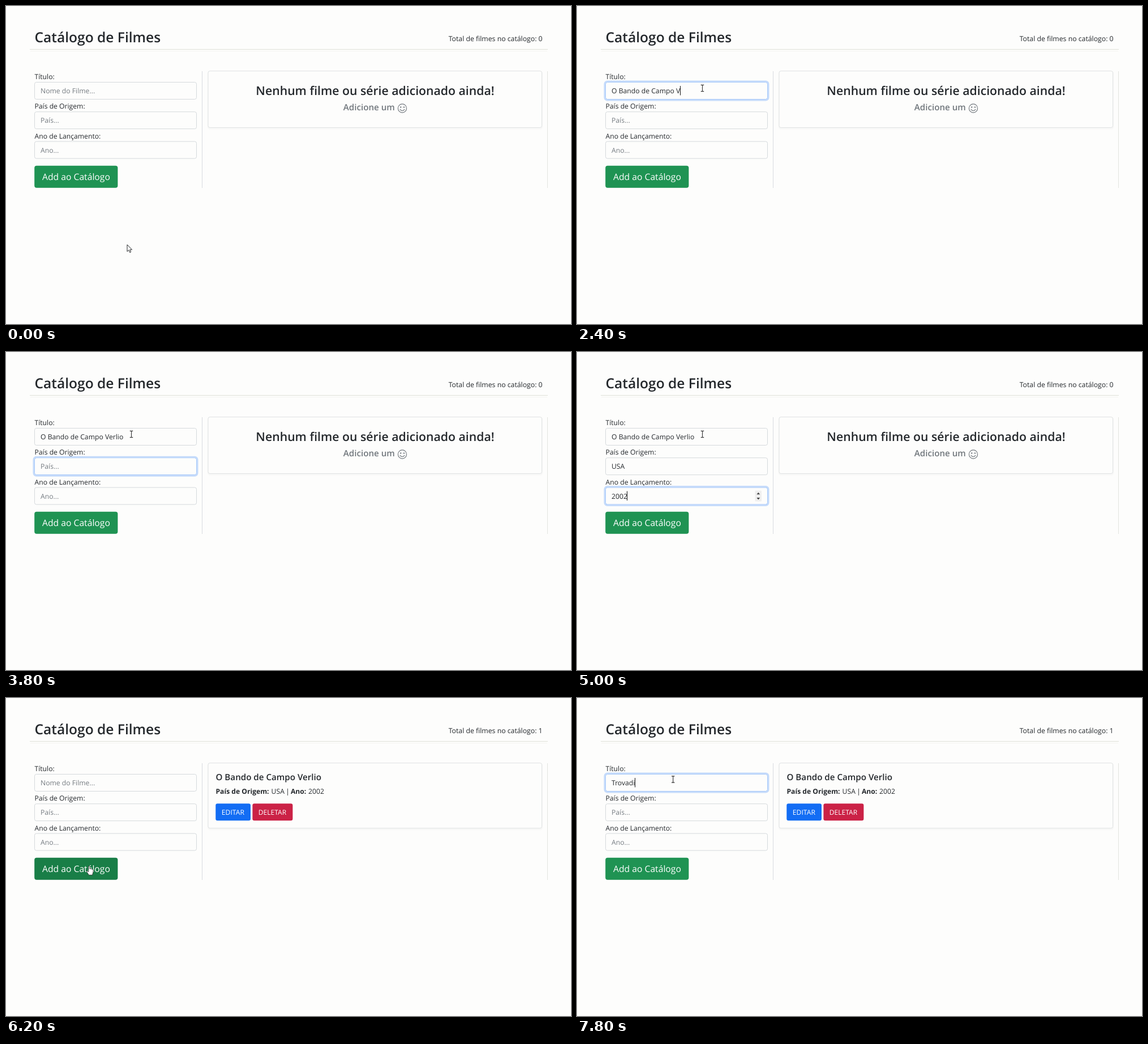
Animation of 998 by 561 pixels, one loop 8 s. Source, as an HTML page:

```html
<!DOCTYPE html>
<html lang="pt-BR">
<head>
<meta charset="utf-8">
<title>Catálogo de Filmes</title>
<style>
  html, body { margin: 0; width: 100%; height: 100%; overflow: hidden; background: #fdfdfc; }
  svg { display: block; width: 100vw; height: 100vh; }
  text { font: 12.18px "Open Sans", "Noto Sans", sans-serif; fill: #24282c; white-space: pre; text-rendering: geometricPrecision; }
  .semi { font-weight: 600; }
  .bold { font-weight: 700; }
  .end { text-anchor: end; }
  .mid { text-anchor: middle; }
  .light { fill: #fff; }
  .gray { fill: #71777d; }
  .box { fill: #fdfdfc; stroke: #d5d9dc; }
  .card { fill: #fdfdfc; stroke: #dfe2e2; }
  .shade { fill: none; stroke: #000; stroke-opacity: .02; stroke-width: 4; }
  .ring { fill: none; stroke: #c5dbfb; stroke-width: 3; }
</style>
</head>
<body>
<svg id="stage" viewBox="0 0 998 561"></svg>
<script>
const LOOP = 8000, STEP = 200;
const FILM = "O Bando de Campo Verlio", NEXT_FILM = "Trovadil", COUNTRY = "USA", YEAR = "2002";
const ADDED_AT = 6200;

const rect = (x, y, w, h, r, attrs) =>
  `<rect x="${x}" y="${y}" width="${w}" height="${h}" rx="${r}" ${attrs}/>`;
const text = (x, y, s, cls = "", size = 12.18, id = "") =>
  `<text x="${x}" y="${y}" class="${cls}" style="font-size:${size}px" id="${id}">${s}</text>`;
const line = (d, color, attrs = "") => `<path d="${d}" fill="none" stroke="${color}" ${attrs}/>`;

const fields = [
  { label: "Título:", hint: "Nome do Filme...", y: 134.5 },
  { label: "País de Origem:", hint: "País...", y: 186.7 },
  { label: "Ano de Lançamento:", hint: "Ano...", y: 239 }
];

const fieldMarkup = ({ label, y }, i) =>
  text(50.5, y - 5.3, label) +
  rect(50.5, y, 286, 30, 3.2, `class="box" id="box${i}"`) +
  rect(49, y - 1.5, 289, 33, 4.6, `class="ring" id="ring${i}"`) +
  text(61, y + 19.6, "", "", 12.18, "value" + i);

const card = h =>
  rect(357.5, 116, 589, h, 3.2, 'class="shade"') +
  rect(357, 114.7, 589.5, h, 3.2, 'class="card"');

const wink = `<g transform="translate(700 180.5)" fill="none" stroke="#71777d" stroke-width="1.1" stroke-linecap="round">
  <circle r="7.6"/><path d="M-4 1.9Q0 6.6 4 1.9M1.6 -1.7Q3 -3 4.4 -1.7"/>
  <ellipse cx="-2.7" cy="-2" rx="1" ry="1.4" fill="#71777d" stroke="none"/></g>`;

const cursors = `
  <path id="arrow" d="M0 0V12.2L2.8 9.6L4.8 13.9L6.7 13L4.8 8.9H8.6Z" fill="#fff" stroke="#26282a" stroke-width="1"/>
  <path id="beam" d="M-2.7 -5.6H-.7L0 -5L.7 -5.6H2.7M0 -5V5M-2.7 5.6H-.7L0 5L.7 5.6H2.7" fill="none" stroke="#333" stroke-width="1.1"/>
  <path id="hand" d="M-2.2 -7Q-.9 -8.2 .2 -7V-2.7Q1.5 -3.6 2.4 -2.3Q3.7 -3 4.4 -1.7Q5.8 -2 6 -.4V3.2L4.6 8.3H-1.6L-5.2 2.9Q-5.6 .7 -3.8 1.2L-2.2 2.6Z" fill="#fff" stroke="#25302a" stroke-width=".9" stroke-linejoin="round"/>`;

const $ = id => document.getElementById(id);
$("stage").innerHTML =
  text(50.5, 64, "Catálogo de Filmes", "semi", 24.55) +
  text(947.6, 62, "", "end", 12.25, "total") +
  line("M42 76.5H957", "#dfe1d8") +
  line("M43 79.5H956", "#f4f4f0") +
  line("M346.5 115V321", "#d9dbe0") +
  line("M956.5 115V321", "#e3e4df") +
  fields.map(fieldMarkup).join("") +
  `<g id="spinner">${rect(314.5, 244.5, 11.5, 19, 1, 'fill="#efefef"')}
    <path d="M317.4 251.2L320.3 247.8L323.2 251.2ZM317.4 257L320.3 260.4L323.2 257Z" fill="#444"/></g>` +
  line("", "#111", 'id="caret"') +
  rect(50.2, 281.8, 147.2, 38.9, 4, 'id="add"') +
  text(64, 307.4, "Add ao Catálogo", "light", 15.7) +
  `<g id="empty">${card(99.8)}${text(652, 157, "Nenhum filme ou série adicionado ainda!", "semi mid", 21.22)}
    ${text(595.8, 184.2, "Adicione um", "semi gray", 15.15)}${wink}</g>` +
  `<g id="entry">${card(115)}${text(370.5, 144.8, FILM, "semi", 15.15)}
    ${text(370.5, 168.6, "País de Origem:", "bold", 12.13)}${text(468.6, 168.6, COUNTRY)}
    ${text(497.6, 168.6, "|", "mid")}${text(503, 168.6, "Ano:", "bold", 12.13)}${text(534, 168.6, YEAR)}
    ${rect(370.3, 186.2, 61.7, 30, 3.2, 'fill="#136df4"')}${text(380.8, 205.9, "EDITAR", "light")}
    ${rect(435.4, 186.2, 71, 30, 3.2, 'fill="#cb2246"')}${text(445.8, 205.9, "DELETAR", "light", 12.05)}</g>` +
  `<g id="pointer">${cursors}</g>`;

const show = (id, on) => $(id).style.display = on ? "" : "none";
const typed = (s, t, start, per) => s.slice(0, Math.max(0, Math.floor((t - start) / per + 1e-6)));

// start, end, from, to
const moves = [
  [0, 550, [214, 421], [221.5, 145]],
  [5000, 5800, [221.5, 145], [148, 304]],
  [6200, 6900, [148, 304], [169.7, 143.5]]
];
function pointerAt(t) {
  let pos = moves[0][2];
  for (const [a, b, from, to] of moves) {
    if (t < a) break;
    const p = Math.min(1, (t - a) / (b - a)), e = p * p * (3 - 2 * p);
    pos = from.map((v, i) => v + (to[i] - v) * e);
  }
  return pos;
}

// time, focused field
const focusChanges = [[500, 0], [3200, 1], [4300, 2], [ADDED_AT, -1], [6900, 0]];
// start and end of each burst of typing
const bursts = [[1200, 2800], [4000, 4300], [4400, 5000], [7300, 8000]];

function draw(t) {
  const added = t >= ADDED_AT;
  const [since, focus] = focusChanges.filter(f => f[0] <= t).pop() || [0, -1];
  const values = added
    ? [typed(NEXT_FILM, t, 7333, 200 / 3), "", ""]
    : [typed(FILM, t, 1200, 200 / 3), typed(COUNTRY, t, 3900, 100), typed(YEAR, t, 4400, 120)];

  fields.forEach((f, i) => {
    const el = $("value" + i), on = focus === i;
    el.textContent = values[i] || f.hint;
    el.style.fill = values[i] ? "#24282c" : "#757b81";
    show("ring" + i, on);
    $("box" + i).style.stroke = on ? "#8db9f8" : "";
  });

  const typing = bursts.some(([a, b]) => t >= a && t <= b);
  show("caret", focus >= 0 && (typing || (t - since) % 1000 < 500));
  if (focus >= 0) {
    const width = values[focus] ? $("value" + focus).getComputedTextLength() : 0;
    const x = Math.floor(61 + width) + .5, y = fields[focus].y;
    $("caret").setAttribute("d", `M${x} ${y + 6.5}V${y + 23}`);
  }
  show("spinner", focus === 2);

  show("empty", !added);
  show("entry", added);
  $("total").textContent = "Total de filmes no catálogo: " + (added ? 1 : 0);

  const [x, y] = pointerAt(t);
  const onAdd = x > 50 && x < 198 && y > 282 && y < 321;
  const onField = x < 337 && fields.some(f => y > f.y && y < f.y + 30);
  $("add").style.fill = onAdd ? "#197e47" : "#1f9353";
  show("hand", onAdd);
  show("beam", onField);
  show("arrow", !onAdd && !onField);
  $("pointer").setAttribute("transform", `translate(${x} ${y})`);
}

const begin = performance.now();
function tick() {
  const t = (performance.now() - begin) % LOOP;
  draw(Math.floor(t / STEP) * STEP);
  requestAnimationFrame(tick);
}
tick();
</script>
</body>
</html>
```
